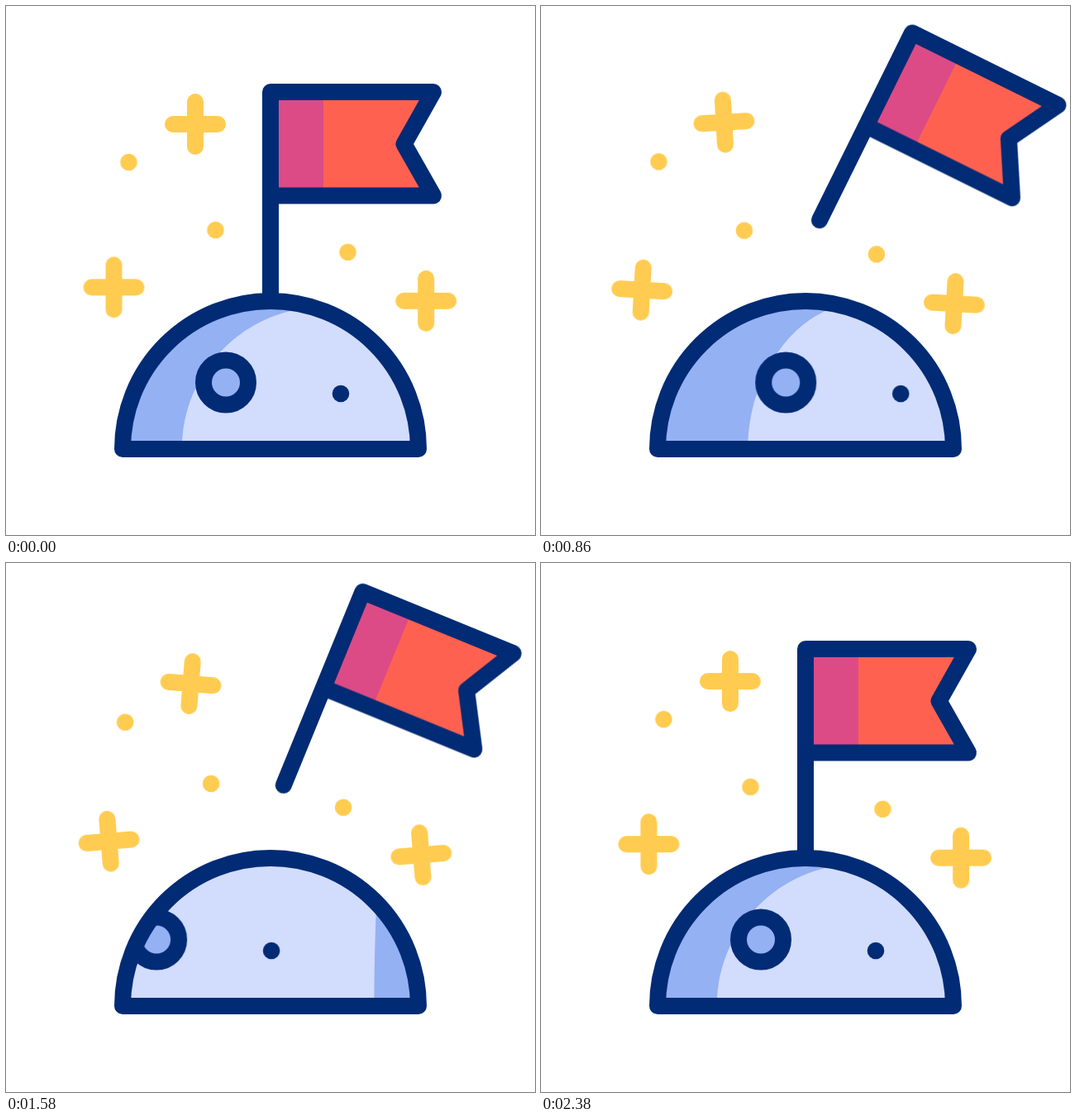
Write an HTML page without scripts that moves like this. It is 640x640 px and loops after 2.4 s.

```html
<!DOCTYPE html>
<html lang="en">
<head>
<meta charset="utf-8">
<title>Flag on the moon</title>
<style>
  html, body { margin: 0; width: 100%; height: 100%; overflow: hidden; background: #fff; }
  svg { display: block; width: 100%; height: 100%; }

  .line { fill: none; stroke: #022b75; stroke-width: 20; stroke-linecap: round; stroke-linejoin: round; }
  .navy { fill: #022b75; }
  .shade { fill: #94b1f3; }
  .stars { fill: #ffcc51; stroke: #ffcc51; stroke-width: 20; stroke-linecap: round; }
  .stars circle { stroke: none; }

  .flag, .spots, .dark, .float { animation: 2.4s linear infinite; }
  .flag { animation-name: plant; transform-origin: 320px 357px; }
  .spots { animation-name: spin; }
  .dark { animation-name: shade; }
  .float { animation-name: float; }

  @keyframes plant {
    0% { transform: none; animation-timing-function: ease-in-out; }
    22.5% { transform: translate(16px, -100px) rotate(25.2deg); }
    28.33% { transform: translate(16px, -100px) rotate(25.65deg); animation-timing-function: ease-in-out; }
    44.17% { transform: translate(18px, -95px) rotate(27.07deg); animation-timing-function: ease-in; }
    57.5% { transform: translate(18px, -91px) rotate(25.85deg); animation-timing-function: ease-in; }
    67.5% { transform: translate(15px, -87px) rotate(21deg); animation-timing-function: cubic-bezier(.4, .2, .8, .7); }
    72.5% { transform: translate(6px, -30px) rotate(6.4deg); }
    74.6% { transform: translate(0, 0) rotate(0deg); animation-timing-function: ease-out; }
    80% { transform: translate(0, 0) rotate(-9deg); animation-timing-function: ease-in-out; }
    89.6% { transform: translate(0, 0) rotate(8.8deg); animation-timing-function: ease-in-out; }
    98.5%, 100% { transform: translate(0, 0) rotate(0deg); }
  }

  @keyframes spin {
    0% { transform: none; animation-timing-function: cubic-bezier(.4, 0, .75, .85); }
    15% { transform: translateX(-43.5px); animation-timing-function: ease-out; }
    28.33% { transform: translateX(-50px); animation-timing-function: cubic-bezier(.4, 0, .75, .67); }
    44.17% { transform: translateX(234px); }
    57.5% { transform: translateX(577px); animation-timing-function: cubic-bezier(.3, .56, .6, .93); }
    72.5% { transform: translateX(782px); animation-timing-function: ease-out; }
    100% { transform: translateX(820px); }
  }

  @keyframes shade {
    0% { d: path("M213 536C213 441 290 364 385 364H-300C-300 420 -300 480 -300 536Z"); animation-timing-function: cubic-bezier(.4, 0, .75, .85); }
    15% { d: path("M175 536C175 441 252 364 347 364H-300C-300 420 -300 480 -300 536Z"); animation-timing-function: ease-out; }
    28.33% { d: path("M173 536C173 441 250 364 345 364H-300C-300 420 -300 480 -300 536Z"); animation-timing-function: cubic-bezier(.4, 0, .75, .67); }
    44.17% { d: path("M447 536C447 480 428 425 388 364H-30C-43 420 -49 480 -49 536Z"); }
    57.5% { d: path("M790 536C790 480 771 425 731 364H313C300 420 294 480 294 536Z"); }
    69.17% { d: path("M1000 536C1000 480 980 425 940 364H505C505 420 505 480 505 536Z"); animation-timing-function: step-end; }
    69.2% { d: path("M130 536C130 441 207 364 302 364H-300C-300 420 -300 480 -300 536Z"); }
    72.5% { d: path("M160 536C160 441 237 364 332 364H-300C-300 420 -300 480 -300 536Z"); animation-timing-function: ease-out; }
    100% { d: path("M213 536C213 441 290 364 385 364H-300C-300 420 -300 480 -300 536Z"); }
  }

  /* --x: sideways reach, --a and --b: vertical reach in each half, --r: tilt */
  @keyframes float {
    0%, 100% { transform: translate(0, 0) rotate(0deg); }
    7.5% { transform: translate(calc(var(--x) * .05), calc(var(--a) * .5)) rotate(calc(var(--r) * .2)); }
    15% { transform: translate(calc(var(--x) * .22), var(--a)) rotate(calc(var(--r) * .56)); }
    22.5% { transform: translate(calc(var(--x) * .52), calc(var(--a) * 1.05)) rotate(calc(var(--r) * .92)); }
    28.33% { transform: translate(calc(var(--x) * .72), calc(var(--a) * .93)) rotate(var(--r)); }
    37% { transform: translate(calc(var(--x) * .92), calc(var(--a) * .73 + var(--b) * .27)) rotate(calc(var(--r) * .6)); }
    44.17% { transform: translate(var(--x), calc(var(--a) * .5 + var(--b) * .5)) rotate(calc(var(--r) * .1)); }
    50% { transform: translate(calc(var(--x) * .98), calc(var(--a) * .3 + var(--b) * .7)) rotate(calc(var(--r) * -.4)); }
    57.5% { transform: translate(calc(var(--x) * .84), calc(var(--a) * .1 + var(--b) * .9)) rotate(calc(var(--r) * -.86)); }
    65% { transform: translate(calc(var(--x) * .66), calc(var(--b) * 1.03)) rotate(calc(var(--r) * -.95)); }
    72.5% { transform: translate(calc(var(--x) * .48), var(--b)) rotate(calc(var(--r) * -.8)); }
    90% { transform: translate(calc(var(--x) * .14), calc(var(--b) * .4)) rotate(calc(var(--r) * -.25)); }
  }
</style>
</head>
<body>
<svg viewBox="0 0 640 640">
  <defs>
    <path id="dome" d="M141 536A179 179 0 0 1 499 536Z"/>
    <path id="plus" d="M-27 0H27M0-27V27"/>
    <g id="marks">
      <circle class="shade" cx="266" cy="455.5" r="27"/>
      <circle class="line" cx="266" cy="455.5" r="27"/>
      <circle class="navy" cx="405" cy="469" r="10.3"/>
    </g>
    <clipPath id="inside"><use href="#dome"/></clipPath>
  </defs>

  <g class="stars">
    <g transform="translate(229 143)"><use class="float" href="#plus" style="--x:-8.5px;--a:-4px;--b:3px;--r:-5deg"/></g>
    <g transform="translate(130.5 340.3)"><use class="float" href="#plus" style="--x:-9.3px;--a:5.5px;--b:-3.5px;--r:5deg"/></g>
    <g transform="translate(508.2 356.8)"><use class="float" href="#plus" style="--x:-9.2px;--a:5.5px;--b:-3.5px;--r:5deg"/></g>
    <g transform="translate(148.5 189)"><circle class="float" r="10.3" style="--x:-6.8px;--a:-2px;--b:3.5px;--r:0deg"/></g>
    <g transform="translate(253.5 271)"><circle class="float" r="10.3" style="--x:-8.5px;--a:2px;--b:-4px;--r:0deg"/></g>
    <g transform="translate(413.5 297.8)"><circle class="float" r="10.3" style="--x:-8.5px;--a:4px;--b:-2px;--r:0deg"/></g>
  </g>

  <g class="flag">
    <path fill="#ff6151" d="M320 104H517L482 167L517 229.5H320Z"/>
    <path fill="#dc4b86" d="M320 104H384V229.5H320Z"/>
    <path class="line" d="M320 357V104H517L481.5 167L517 229.5H320"/>
  </g>

  <g clip-path="url(#inside)">
    <use href="#dome" fill="#d2dcfd"/>
    <path class="shade dark" d="M213 536C213 441 290 364 385 364H-300C-300 420 -300 480 -300 536Z"/>
    <g class="spots">
      <use href="#marks"/>
      <use href="#marks" x="-820"/>
    </g>
  </g>
  <use class="line" href="#dome"/>
</svg>
</body>
</html>
```
